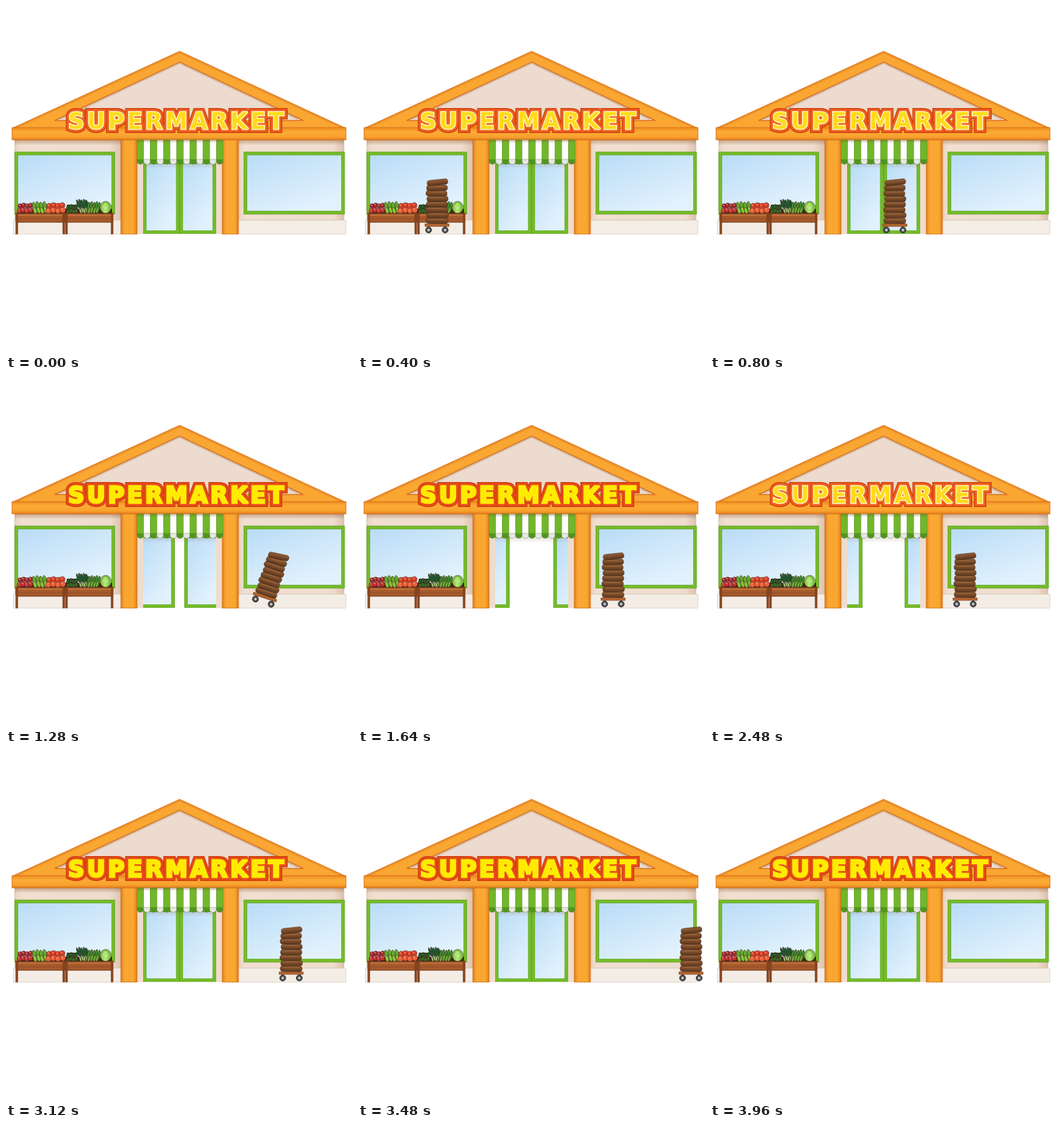
An HTML page that plays this animation: 512 px wide and 512 px high, repeating every 4 s.

```html
<!DOCTYPE html>
<html lang="en">
<head>
<meta charset="utf-8">
<title>Supermarket</title>
<style>
  html, body { margin: 0; width: 100%; height: 100%; overflow: hidden; background: #fff; }
  svg { display: block; width: 100vw; height: 100vh; }
  .sign { font: bold 33px "DejaVu Sans", Inter, sans-serif; letter-spacing: 4.2px; stroke-miterlimit: 2; }
</style>
</head>
<body>
<svg viewBox="0 0 512 512">
  <defs>
    <linearGradient id="glass" x1="0" y1="0" x2="0.6" y2="1">
      <stop offset="0" stop-color="#b9dcf7"/>
      <stop offset="0.55" stop-color="#d0e8fa"/>
      <stop offset="1" stop-color="#e2f2fd"/>
    </linearGradient>
    <linearGradient id="pillar">
      <stop offset="0" stop-color="#e07c1a"/>
      <stop offset="0.22" stop-color="#f9a732"/>
      <stop offset="0.78" stop-color="#f9a732"/>
      <stop offset="1" stop-color="#df7a18"/>
    </linearGradient>
    <linearGradient id="band" x2="0" y2="1">
      <stop offset="0" stop-color="#ee8c20"/>
      <stop offset="0.35" stop-color="#fbab36"/>
      <stop offset="0.75" stop-color="#f8a22e"/>
      <stop offset="1" stop-color="#e67f1c"/>
    </linearGradient>
    <linearGradient id="wall">
      <stop offset="0" stop-color="#ead3bf"/>
      <stop offset="0.06" stop-color="#f1dfd1"/>
      <stop offset="0.9" stop-color="#efdccd"/>
      <stop offset="1" stop-color="#dcc2ae"/>
    </linearGradient>
    <linearGradient id="shade" x2="0" y2="1">
      <stop offset="0" stop-color="#7a4a20" stop-opacity="0.4"/>
      <stop offset="1" stop-color="#7a4a20" stop-opacity="0"/>
    </linearGradient>
    <linearGradient id="sausage" x2="0" y2="1">
      <stop offset="0" stop-color="#94613a"/>
      <stop offset="0.45" stop-color="#7d4d2a"/>
      <stop offset="1" stop-color="#5a351d"/>
    </linearGradient>
    <clipPath id="panes">
      <rect x="17.5" y="220.5" width="139" height="83"/>
      <rect x="356.5" y="220.5" width="140" height="83"/>
    </clipPath>
    <clipPath id="opening"><rect x="203" y="229" width="108" height="108.5"/></clipPath>
    <clipPath id="pane"><rect x="207.5" y="233.5" width="44.5" height="99"/></clipPath>
    <clipPath id="gable"><path d="M9 181L257 67L503 181Z"/></clipPath>
  </defs>
  <g id="shop"></g>
  <g id="doors" clip-path="url(#opening)"></g>
  <g id="front"></g>
  <g id="produce"></g>
  <g id="cart"></g>
</svg>
<script>
const LOOP = 4000, STEP = 40;
const $ = id => document.getElementById(id);

const tag = (name, attrs, inner = '') =>
  `<${name} ${Object.entries(attrs).map(([k, v]) => `${k}="${v}"`).join(' ')}>${inner}</${name}>`;
const rect = (x, y, width, height, fill, more = {}) => tag('rect', { x, y, width, height, fill, ...more });
const path = (d, fill, more = {}) => tag('path', { d, fill, ...more });
const oval = (cx, cy, rx, ry, fill, more = {}) => tag('ellipse', { cx, cy, rx, ry, fill, ...more });
const range = (n, f) => Array.from({ length: n }, (_, i) => f(i)).join('');
const edge = { stroke: '#cf7018', 'stroke-width': 0.8 };

function glazed(x, y, w, h) {
  const f = 4.5;
  return rect(x, y, w, h, '#76bc28', { stroke: '#55991e', 'stroke-width': 0.7 }) +
    rect(x + f, y + f, w - 2 * f, h - 2 * f, 'url(#glass)', { stroke: '#5aa322', 'stroke-width': 0.7 });
}

// Slanted reflections, shifted along each pane by draw()
function streak(x) {
  const beam = (dx, w, opacity) =>
    path(`M${x + dx} 220h${w}l96 84h${-w}Z`, '#fff', { opacity });
  return beam(-4, 24, 0.5) + beam(28, 7, 0.45);
}

function building() {
  const wing = (x, w) =>
    rect(x, 198, w, 119, 'url(#wall)', { stroke: '#c9ab95', 'stroke-width': 0.7 }) +
    rect(x, 198, w, 8, 'url(#shade)');
  const base = (x, w) => rect(x, 317, w, 20.5, '#f4ede6', { stroke: '#dccdc1', 'stroke-width': 0.8 });
  const bevel = { stroke: '#df731a', 'stroke-width': 6, opacity: 0.4 };
  return wing(13, 157) + wing(344, 156) + base(11, 159) + base(344, 159) +
    rect(194, 198, 127, 139.5, '#f0dccb') +
    rect(194, 198, 127, 38, 'url(#shade)') +
    rect(203, 229, 108, 109, '#fff') +
    path('M9 181L257 67L503 181Z', '#f9a732', { stroke: '#d86f18', 'stroke-width': 1, 'stroke-linejoin': 'round' }) +
    `<g clip-path="url(#gable)">${path('M9 181L257 67L503 181', 'none', bevel)}</g>` +
    path('M72 169.5L257 83L440 169.5Z', '#ecdbce', { stroke: '#d8701c', 'stroke-width': 1.5 }) +
    path('M80 167.5L257 84.5L432 167.5', 'none', { stroke: '#b98e72', 'stroke-width': 2.5, opacity: 0.4 }) +
    rect(170, 198, 24, 139.5, 'url(#pillar)', edge) +
    rect(320, 198, 24, 139.5, 'url(#pillar)', edge) +
    rect(9, 180, 494, 18, 'url(#band)', { stroke: '#d86f1a', 'stroke-width': 1 }) +
    glazed(13, 216, 148, 92) + glazed(352, 216, 149, 92) +
    `<g clip-path="url(#panes)"><g class="shine">${streak(18)}${streak(358)}</g></g>`;
}

function door(id, flip) {
  const leaf = glazed(203, 229, 53.5, 108) +
    `<g clip-path="url(#pane)"><g class="shine">${streak(170)}</g></g>`;
  const place = flip ? 'translate(54 0)' : '';
  return `<g id="${id}"><g transform="${place}">${leaf}</g></g>`;
}

function awning() {
  const n = 13, w = 127 / n;
  return rect(203, 229, 108, 12, 'url(#shade)', { opacity: 0.6 }) + range(n, i => {
    const x = 194 + i * w, green = i % 2 === 0;
    const drop = `M${x} 226v4a${w / 2} 4.3 0 0 0 ${w} 0v-4Z`;
    return path(drop, green ? '#4f971b' : '#e6e8e4', { stroke: '#69745f', 'stroke-width': 0.4 }) +
      rect(x, 198, w, 29, green ? '#72b62a' : '#fff', { stroke: '#5d9a2c', 'stroke-width': 0.5 });
  }) + rect(194, 198, 127, 5, 'url(#shade)');
}

function sign() {
  const line = (id, fill, stroke, width) => tag('text', {
    id, class: 'sign', x: 92, y: 181.5, fill, stroke, 'stroke-width': width, 'paint-order': 'stroke'
  }, 'SUPERMARKET');
  return line('rim', '#d0410f', '#d0410f', 12) + line('plate', '#f0601f', '#f0601f', 9) +
    line('letters', '#ffe600', '#ffe600', 3);
}

function produce() {
  const thin = { stroke: '#37210f', 'stroke-width': 0.5 };
  const row = (n, x, dx, y, f) => range(n, i => f(x + i * dx, y - (i % 2)));
  const ball = (r, c) => (x, y) => oval(x, y, r, r, c, thin) + oval(x - 1, y - 1.3, 1, 0.7, '#ffb09a');
  const pod = (rx, ry, c, lean) => (x, y) =>
    oval(x, y, rx, ry, c, { ...thin, transform: `rotate(${lean} ${x} ${y})` });
  const crate = (x, w) =>
    rect(x, 307, w, 13, '#a65a2c', { stroke: '#6c3417', 'stroke-width': 1 }) +
    path(`M${x + 1} 309.5H${x + w - 1}`, 'none', { stroke: '#c47a43', 'stroke-width': 1.5 }) +
    path(`M${x + 1} 315H${x + w - 1}`, 'none', { stroke: '#8c4721', 'stroke-width': 0.7 });
  const leg = x => rect(x, 306, 3, 31.5, '#8d4722', { stroke: '#63300f', 'stroke-width': 0.5 });
  return rect(17, 300, 140, 8, '#402815') +
    row(4, 21, 5.2, 296, ball(3.4, '#a92b35')) + row(4, 20, 5.4, 303, ball(3.6, '#c8353a')) +
    row(4, 42, 5.2, 297, pod(2.6, 7, '#63ad2c', -12)) + row(4, 43, 5.2, 303, pod(2.5, 5, '#8bc83f', -16)) +
    row(4, 64, 6.4, 296, ball(4.1, '#db4328')) + row(4, 63, 7, 303, ball(4.2, '#ef6039')) +
    rect(90, 294, 16, 13, '#23401f') +
    row(4, 92, 4, 298, pod(2.4, 3.6, '#2f5a2a', 24)) + row(4, 92, 4, 304, pod(2.4, 3, '#3d6a2c', 0)) +
    row(5, 108, 3.4, 295, pod(1.8, 9, '#1f5a33', -24)) + row(5, 110, 3, 303, pod(1.3, 4.5, '#b9d68e', -18)) +
    row(5, 122, 3.8, 298, pod(2, 8, '#3e8d2b', 10)) + row(4, 123, 4, 303, pod(1.8, 5, '#71b33a', 14)) +
    oval(147.5, 298, 8.2, 9, '#7cc142', thin) + oval(147, 299, 4.8, 7.5, '#a5db69') +
    path('M147 292v14M143 296l4 4 4-4', 'none', { stroke: '#dcf2b4', 'stroke-width': 0.9 }) +
    crate(15, 72) + crate(88, 70) + leg(14.5) + leg(84) + leg(88) + leg(155.5);
}

// Cart around x = 0, wheels standing on y = 336
function cart() {
  const wheel = x => path(`M${x} 326v4`, 'none', { stroke: '#777', 'stroke-width': 3 }) +
    oval(x, 331.5, 4.4, 4.4, '#4b4d50', { stroke: '#292a2c', 'stroke-width': 1 }) +
    oval(x, 331.5, 1.9, 1.9, '#c4c8ca');
  const sausage = i => {
    const y = 317.8 - i * 8.1, w = 32.5 - i * 0.25, x = -w / 2 + Math.sin(i * 2.1) * 0.8;
    return rect(x, y - 4.1, w, 8.2, 'url(#sausage)', {
      rx: 3.9, stroke: '#4b2b15', 'stroke-width': 0.6,
      transform: `rotate(${i === 7 ? -6 : Math.cos(i * 2.6)} 0 ${y})`
    }) + (i < 7 ? path(`M${x + 5} ${y - 1.8}h${w - 11}`, 'none', { stroke: '#ab764a', 'stroke-width': 0.8, opacity: 0.6 }) : '');
  };
  return wheel(-12.5) + wheel(12) +
    rect(-17.8, 322.5, 35.6, 3.6, '#b8672f', { stroke: '#713712', 'stroke-width': 0.7 }) +
    range(8, sausage);
}

$('shop').innerHTML = building();
$('doors').innerHTML = door('left', false) + door('right', true);
$('front').innerHTML = awning() + sign();
$('produce').innerHTML = produce();
$('cart').innerHTML = cart();
const shines = document.querySelectorAll('.shine');

const unit = (t, a, b) => Math.min(1, Math.max(0, (t - a) / (b - a)));
const smooth = p => p * p * (3 - 2 * p);

const route = [[40, -24], [800, 273.5], [1100, 379], [1400, 379], [1560, 377.5], [2840, 377.5], [2940, 386], [3120, 422], [3720, 540]];

function along(keys, t) {
  const i = keys.findIndex(k => k[0] > t);
  if (i === 0) return keys[0][1];
  if (i < 0) return keys[keys.length - 1][1];
  const [a, x] = keys[i - 1], [b, y] = keys[i];
  return x + (y - x) * unit(t, a, b);
}

function draw(t) {
  const gap = 32.5 * (smooth(unit(t, 1120, 1650)) - smooth(unit(t, 2420, 2940)));
  $('left').setAttribute('transform', `translate(${-gap} 0)`);
  $('right').setAttribute('transform', `translate(${gap} 0)`);

  const tip = 18 * Math.sin(Math.PI * unit(t, 1080, 1480));
  $('cart').setAttribute('transform', `translate(${along(route, t)} 0) rotate(${tip} 12 336)`);

  const shift = (t - 2000) * 0.4;
  for (const s of shines) {
    s.setAttribute('transform', `translate(${shift} 0)`);
    s.setAttribute('visibility', Math.abs(shift) < 150 ? 'inherit' : 'hidden');
  }

  const lit = t % 2000 < 1000;
  const paint = (id, fill, stroke) => {
    $(id).setAttribute('fill', fill);
    $(id).setAttribute('stroke', stroke);
  };
  const plate = lit ? '#f0601f' : '#e74a1c';
  paint('letters', lit ? '#ffdb1c' : '#ffeb00', lit ? '#fff6c4' : '#ffeb00');
  paint('plate', plate, plate);
}

const start = performance.now();
function tick(now) {
  const t = Math.max(0, now - start) % LOOP;
  draw(Math.floor(t / STEP) * STEP);
  requestAnimationFrame(tick);
}
draw(0);
requestAnimationFrame(tick);
</script>
</body>
</html>
```
